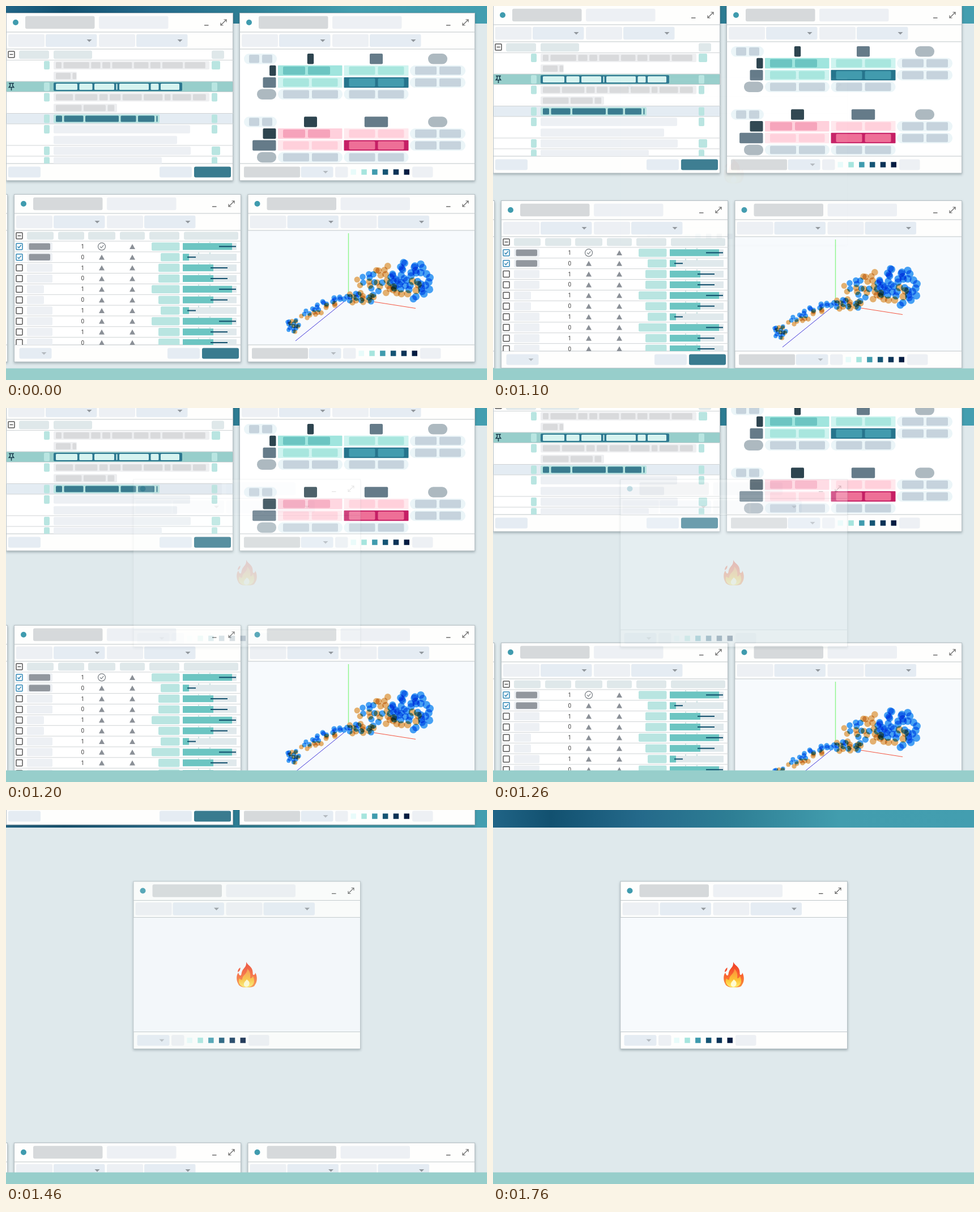
Recreate the animation shown at these times as an HTML page. Size 849 by 660 pixels, loop 3 s.

```html
<!DOCTYPE html>
<html lang="en">
<head>
<meta charset="utf-8">
<title>Panels</title>
<style>
html, body { margin: 0; width: 100%; height: 100%; overflow: hidden; background: #dfe9ec; }
svg { display: block; width: 849px; height: 660px; }
text { font: 10px Roboto, "Liberation Sans", sans-serif; fill: #444; text-anchor: end; }
.frame { filter: drop-shadow(0 2px 2px rgba(40, 60, 70, .35)); }
.dots { isolation: isolate; }
.dots circle { mix-blend-mode: multiply; }
</style>
</head>
<body>
<svg id="stage" viewBox="0 0 849 660">
  <defs>
    <linearGradient id="sky">
      <stop offset="0" stop-color="#206486"/>
      <stop offset=".12" stop-color="#125170"/>
      <stop offset=".3" stop-color="#24698a"/>
      <stop offset=".5" stop-color="#2e7f95"/>
      <stop offset=".72" stop-color="#429dae"/>
      <stop offset="1" stop-color="#439eb0"/>
    </linearGradient>
    <linearGradient id="fire" x2="0" y2="1">
      <stop offset="0" stop-color="#ee3b26"/>
      <stop offset=".5" stop-color="#f9612f"/>
      <stop offset="1" stop-color="#f9913a"/>
    </linearGradient>
    <linearGradient id="glow" x2="0" y2="1">
      <stop offset="0" stop-color="#fb8a3c"/>
      <stop offset=".6" stop-color="#fdc234"/>
      <stop offset="1" stop-color="#fff06a"/>
    </linearGradient>
    <clipPath id="list"><rect y="76" width="401" height="202"/></clipPath>
    <clipPath id="table"><rect x="14" y="396" width="401" height="202"/></clipPath>
  </defs>
  <rect width="849" height="660" fill="#dfe9ec"/>
  <rect width="849" height="31" fill="url(#sky)"/>
  <g id="top"></g>
  <g id="low"></g>
  <g id="pop"></g>
  <rect y="639.5" width="849" height="21" fill="#97cecb"/>
</svg>
<script>
const GREY = '#d6d9db', PALE = '#edf0f4', FIELD = '#e5ecf3', LINE = '#cfd3d5', MINT = '#b9e5e1',
  HEAD = '#dfe8ea', CHIP = '#d9dadc', TEAL = '#6cc5c2', DEEP = '#397b8f', INK = '#2d444f',
  SLATE = '#657b89', ASH = '#adb9c0', ICE = '#ebf5f8', STEEL = '#c6d3dd', MARK = '#92979e';

let seed = 7;
const rand = () => (seed = seed * 16807 % 2147483647) / 2147483647;

// Boxes are given by their left edge, width and vertical centre.
const box = (x, w, cy, h, fill, r = 2) =>
  `<rect x="${x}" y="${cy - h / 2}" width="${w}" height="${h}" rx="${r}" fill="${fill}"/>`;
const line = (x1, y1, x2, y2, c, w = 1) =>
  `<path d="M${x1} ${y1}L${x2} ${y2}" stroke="${c}" stroke-width="${w}"/>`;
const stroke = (d, c, w) => `<path d="${d}" fill="none" stroke="${c}" stroke-width="${w}"/>`;
const arrow = (x, y, c = '#92989e') => `<path d="M${x - 4.5} ${y - 2}h9l-4.5 4.5z" fill="${c}"/>`;
const dot = (x, y, r, c) => `<circle cx="${x}" cy="${y}" r="${r}" fill="${c}"/>`;

function panel(x, y, w, body = '#fff') {
  const r = x + w, rule = dy => line(x, y + dy, r, y + dy, '#bfc6c9');
  const ex = r - 17, ey = y + 17;
  return `<rect class="frame" x="${x + .5}" y="${y + .5}" width="${w - 1}" height="295.5" fill="#fefefd" stroke="#b5bfc4"/>` +
    `<rect x="${x + 1}" y="${y + 64}" width="${w - 2}" height="202" fill="${body}"/>` +
    dot(x + 17, ey, 5, '#3f9bae') +
    box(x + 34, 122.5, ey, 22.5, GREY, 3) + box(x + 164, 122.5, ey, 22.5, PALE, 3) +
    line(r - 51, y + 22, r - 43.5, y + 22, '#555', 1.3) +
    stroke(`M${ex - 5} ${ey + 5}l10-10m-4.5 0h4.5v4.5m-10 1v4.5h4.5`, '#666', 1.2) +
    [4, 164].map(d => box(x + d, 64, y + 49, 22.5, PALE, 3) +
      box(x + d + 66, 90.5, y + 49, 22.5, FIELD, 3) + arrow(x + d + 143, y + 49)).join('') +
    rule(34) + rule(64) + rule(266);
}

const RAMP = ['#e8fbfa', '#a6e5de', '#3f9bae', '#145474', '#0b3357', '#031c41'];
const select = (x, cy) => box(x, 57, cy, 19, FIELD, 3) + arrow(x + 43.5, cy, '#b4bac0');
const legend = (x, cy) => select(x, cy) + box(x + 60.5, 22.5, cy, 19, PALE, 3) +
  RAMP.map((c, i) => box(x + 88 + i * 18.8, 9.5, cy, 9.5, c, 0)).join('') +
  box(x + 196.5, 36.5, cy, 19, PALE, 3);
const actions = (x, cy) => box(x, 57, cy, 19, FIELD, 3) + box(x + 61, 65, cy, 19, DEEP, 3);

function check(x, y, kind) {
  const c = kind === 'on' ? '#2f86b5' : '#555';
  const sign = { on: 'm-3 0l2.2 2.4l4-5', minus: 'm-3 0h6' }[kind];
  return `<rect x="${x - 5.5}" y="${y - 5.5}" width="11" height="11" rx="1" fill="#fff" stroke="${c}" stroke-width="1.5"/>` +
    (sign ? stroke(`M${x} ${y}${sign}`, c, 1.5) : '');
}

// A bar with word chips in it; widths are drawn at random unless given.
function words(y, w, bg, fg, widths) {
  let out = box(84, w, y, 15, bg), x = 88;
  for (let i = 0; x < 80 + w; i++) {
    const full = widths ? widths[i] || 2 : 10 + 40 * rand() ** 1.5;
    const part = Math.min(full, 83 + w - x);
    out += box(x, part, y, 11, fg, 1.5);
    x += part + 3.5;
  }
  return out;
}

function list() {
  const rule = y => line(0, y, 401, y, LINE);
  const band = (y, c) => `<rect x="1" y="${y}" width="399" height="18.5" fill="${c}"/>` + rule(y) + rule(y + 18.5);
  const tags = (y, w = 10) => box(67, 10, y, 15, MINT) + box(363, w, y, 15, MINT);
  const head = (x, w) => box(x, w, 86, 15, HEAD, 3);
  const grey = (y, w) => words(y, w, '#eeeff1', CHIP), blank = (y, w) => box(84, w, y, 14.5, PALE);
  const out = check(9.5, 85.5, 'minus') + head(23, 53) + head(84, 68) + head(363, 22) + rule(95.5) +
    band(133, '#97cecb') + band(189.5, '#e4ecf3') + rule(246) + rule(265) +
    tags(104.5, 15) + tags(142.5) + tags(161) + tags(199) + tags(217.5) + tags(255.5, 15) + tags(274) +
    grey(104.5, 275) + grey(123.5, 41) + grey(161, 275) + grey(180, 112) +
    words(142.5, 227, '#2d7890', '#d6f3f0', [38, 23, 35, 2, 52, 14, 33]) +
    words(199, 187, MINT, DEEP, [11, 34, 59, 27, 29]) +
    blank(217.5, 241) + blank(236.5, 218) + blank(255.5, 242) + blank(274, 191) +
    stroke('M5 136.5h9M7.3 137v4l-2 2.5h8.4l-2-2.5v-4M9.5 144v5', '#16394a', 1.5);
  return `<g clip-path="url(#list)">${out}</g>`;
}

// One matrix: dark and slate are the widths of its header blocks.
function grid(y, dark, slate, [strong, strongChip, solid, solidChip, bg, fg]) {
  const cell = (x, w, cy, c, chip, r = 1, span = w) => {
    const half = (span - 22) / 2;
    return box(x, w, cy, 18.5, c, r) + box(x + 9, half, cy, 14.5, chip) + box(x + 14 + half, half, cy, 14.5, chip);
  };
  const ice = (x, w, cy) => cell(x, w, cy, ICE, STEEL, 9);
  const [y1, y2, y3] = [1, 2, 3].map(i => y + i * 20.8);
  return ice(420, 58, y) + box(537.5 - dark / 2, dark, y, 18.5, INK) +
    box(653.5 - slate / 2, slate, y, 18.5, SLATE) + box(745, 34, y, 18.5, ASH, 9) +
    box(476.5 - dark, dark, y1, 18.5, INK) + box(476.5 - slate, slate, y2, 18.5, SLATE) +
    box(443, 34, y3, 18.5, ASH, 9) +
    cell(480, 113.5, y1, strong, strongChip, 1, 100) + cell(596.5, 114, y1, bg, fg) +
    cell(480, 113.5, y2, bg, fg) + cell(596.5, 114, y2, solid, solidChip) +
    ice(713, 98, y1) + ice(713, 98, y2) + ice(480, 114, y3) + ice(596.5, 114, y3);
}

function table() {
  const kinds = [
    { tag: 49.5, bar: 87, from: 376, to: 406 },
    { tag: 33.5, bar: 11, from: 320, to: 335 },
    { tag: 37.5, bar: 54, from: 361, to: 391 },
  ];
  const tri = (x, y) => `<path d="M${x - 5} ${y + 4.5}h10l-5-9z" fill="#8b9097"/>`;
  const head = (x, w) => box(x, w, 405.5, 14, HEAD, 3);
  let out = check(23.5, 405.5, 'minus') + head(37, 47) + head(92, 46) + head(145, 48) +
    head(201, 44) + head(253, 53) + head(314, 96);
  [...'0122021022'].forEach((k, i) => {
    const y = 424.4 + i * 18.85, { tag, bar, from, to } = kinds[k], on = i < 2;
    out += line(14, y - 9.4, 415, y - 9.4, LINE) + check(23.5, y, on ? 'on' : '') +
      box(37, i === 4 || i === 5 ? 30 : 45, y, 14.5, PALE) + (on ? box(40.5, 37.5, y, 11.5, MARK) : '') +
      `<text x="138" y="${y + 3.5}">${1 - i % 2}</text>` +
      (i ? tri(169, y) : stroke(`M175.5 ${y}a6.5 6.5 0 1 0-13 0a6.5 6.5 0 1 0 13 0m-9.5 0l2.3 2.4l4-4.6`, '#777d83', 1.2)) +
      tri(223, y) + box(306.5 - tag, tag, y, 14.5, MINT) +
      box(312, 95, y, 12, '#e0e9ec', 0) + box(312, bar, y, 12, TEAL, 0) + line(from, y, to, y, '#0f4d6b', 2);
  });
  out += [340, 360].map(x => `<path d="M${x} 416V598" stroke="#9ccac9" stroke-dasharray="3 15.85"/>`).join('');
  return `<g clip-path="url(#table)">${out}</g>`;
}

// Scatter n dots over a tilted ellipse, m of them amber.
function blob(cx, cy, rx, ry, n, m, tilt = 0) {
  let out = '';
  for (let i = 0; i < n; i++) {
    const a = i * 2.4 + rand() * .8, d = Math.sqrt((i + .5) / n);
    const u = rx * d * Math.cos(a), v = ry * d * Math.sin(a);
    const x = cx + u * Math.cos(tilt) - v * Math.sin(tilt), y = cy + u * Math.sin(tilt) + v * Math.cos(tilt);
    out += dot(x, y, 3.6 + (x - 495) * .0128, i * m % n < m ? '#e3b070' : '#46a0f4');
  }
  return out;
}
const cloud = () => line(604.5, 401, 604.5, 516, '#8df58a', 1.4) +
  line(605, 515, 723, 533.5, '#f4553f') + line(605, 515, 511, 591, '#4038d8') + '<g class="dots">' +
  blob(506, 564, 11, 13, 19, 6) + blob(560, 531, 48, 9, 29, 11, -.42) + blob(626, 515, 28, 10, 20, 11) +
  blob(637, 486, 19, 16, 11, 4) + blob(669, 484, 20, 28, 18, 14) + blob(714, 484, 38, 34, 48, 6) + '</g>';

const flame = '<path d="M424 268C426 274 435 276 435.5 286C435.5 290 436 291 437 291C439 291 440 289 440 287C443 292 444 300 441 306L438 311C434 313 430 313 425 313C420 313 415 313 411 309L409 305C406 298 407 291 410 287C411 290 412 292 414 292C416 292 415 288 417 284C419 279 425 277 424 268Z" fill="url(#fire)"/>' +
  '<path d="M413.5 278C410 280 409 283 409 286C412 285 414 282 413.5 278Z" fill="#f4502f"/>' +
  '<path d="M426 280C431 285 432 290 431 297C434 297 435 295 436 293C439 300 439 306 434 310C429 314 420 314 415 310C410 306 410 301 412 297C414 300 416 300 417 299C417 291 426 290 426 280Z" fill="url(#glow)"/>' +
  '<path d="M425 299C429 302 431 305 429 309C427 313 421 313 420 309C419 305 422 303 425 299Z" fill="#fffbd0"/>';

const put = (id, html) => document.getElementById(id).innerHTML = html;
put('top', panel(0, 12, 401) + list() + box(4, 57, 293, 19, FIELD, 3) + actions(271, 293) +
  panel(412, 12, 416) +
  grid(93.3, 11.4, 23, ['#a0e5de', TEAL, '#26748c', '#429bae', '#cff4f0', '#a8e6de']) +
  grid(204.5, 23, 41.4, ['#ffd0dc', '#f6a3bb', '#c51f65', '#ee6f97', '#ffe8ed', '#ffd0db']) +
  box(420, 99, 293, 19, GREY) + legend(520.5, 293));
put('low', panel(-398, 332, 401) + panel(14, 332, 401) + table() + select(23.5, 613) + actions(285, 613) +
  panel(426.5, 332, 401.5, '#f7fafd') + cloud() + box(434, 99, 613, 19, GREY) + legend(534.5, 613));
put('pop', panel(224.5, 125.5, 401.5, '#f7fafd') + legend(231.5, 406.5) + flame);

const LOOP = 3000;
const KEYS = [
  { ms: 930, up: 0, down: 0, fade: 0 },
  { ms: 960, up: 1, down: 1, fade: 0 },
  { ms: 1100, up: 13, down: 11, fade: .03 },
  { ms: 1200, up: 56, down: 51, fade: .16 },
  { ms: 1360, up: 147, down: 133, fade: .45 },
  { ms: 1460, up: 282, down: 255, fade: .84 },
  { ms: 1560, up: 417, down: 377, fade: .96 },
  { ms: 1760, up: 417, down: 377, fade: 1 },
];
function at(ms, prop) {
  const i = KEYS.findIndex(k => k.ms >= ms), b = KEYS[i], a = KEYS[i - 1] || b;
  return a === b ? b[prop] : a[prop] + (b[prop] - a[prop]) * (ms - a.ms) / (b.ms - a.ms);
}

// The picture changes 30 times a second, on whole hundredths.
function play(id, prop, style) {
  const keys = [{ offset: 0, easing: 'step-end', ...style(0) }];
  for (let tick = 29; tick < 54; tick++) {
    const ms = Math.floor(tick * 10 / 3) * 10;
    keys.push({ offset: ms / LOOP, easing: 'step-end', ...style(at(ms, prop)) });
  }
  keys.push({ ...keys[keys.length - 1], offset: 1 });
  document.getElementById(id).animate(keys, { duration: LOOP, iterations: Infinity });
}
play('top', 'up', v => ({ transform: `translateY(${-Math.round(v)}px)` }));
play('low', 'down', v => ({ transform: `translateY(${Math.round(v)}px)` }));
play('pop', 'fade', v => ({ opacity: v }));
</script>
</body>
</html>
```
